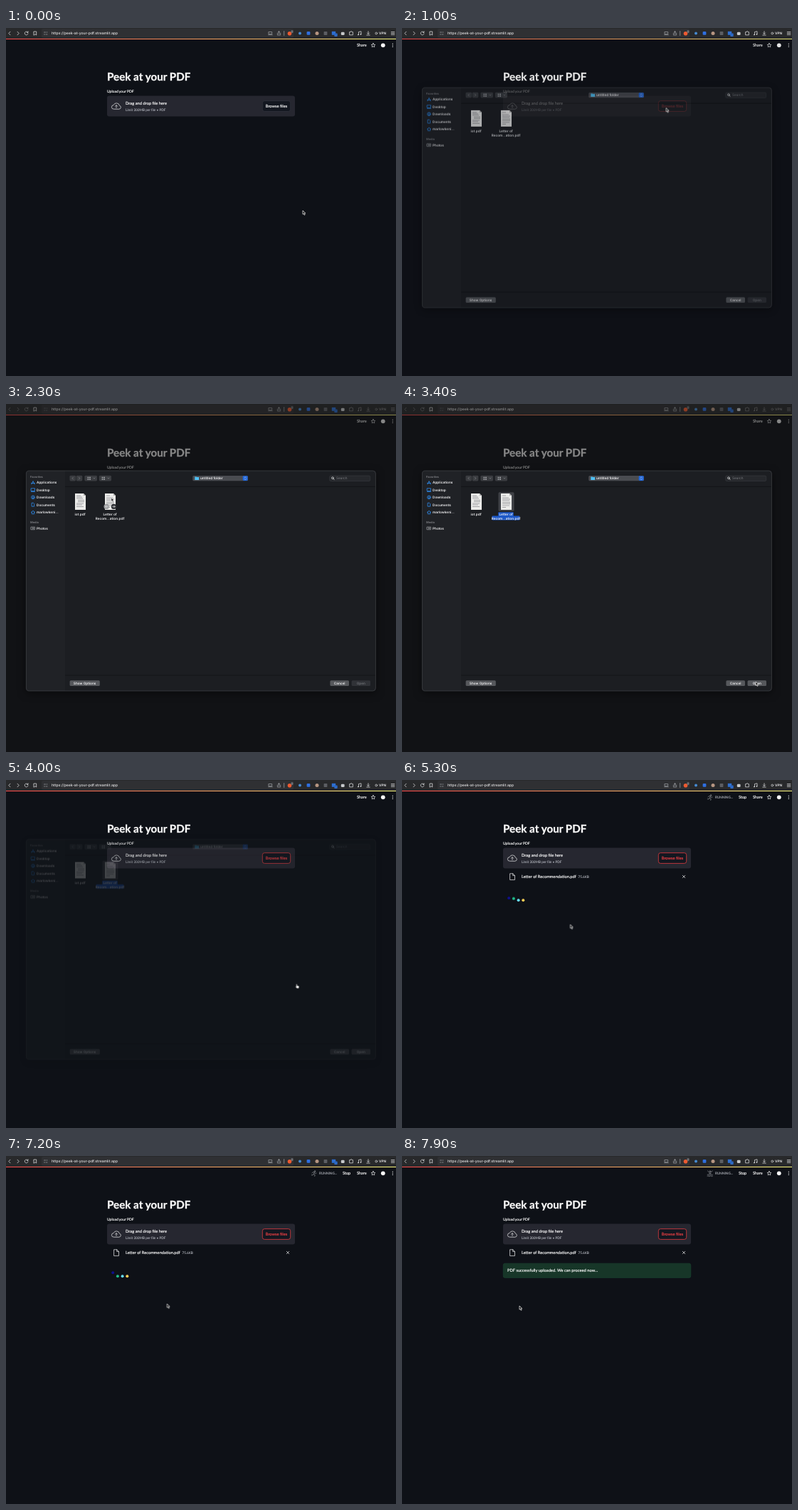
Animation of 548 by 490 pixels, one loop 8000 ms. Source, as an HTML page:

```html
<!DOCTYPE html>
<html lang="en">
<head>
<meta charset="utf-8">
<title>PDF upload</title>
<style>
html, body { margin: 0; width: 100%; height: 100%; overflow: hidden; background: #0e1117; }
svg { display: block; width: 100vw; height: 100vh; }
text { text-rendering: geometricPrecision; white-space: pre; }
.page { font: 5.75px Lato, sans-serif; fill: #fafafa; }
.page text { stroke: currentColor; color: #fafafa; stroke-width: .16; }
.page .title { font-size: 15.2px; font-weight: 700; stroke-width: .3; }
.page .label { font-size: 5px; }
.page .hint { font-size: 4.7px; fill: #b4b7bf; color: #b4b7bf; stroke-width: .08; }
.mac { font: 600 4.7px Inter, sans-serif; fill: #f0f0f2; }
.mac .head { font-size: 4px; fill: #808287; }
.mid { text-anchor: middle; }
.line { fill: none; stroke: #d6d7d9; stroke-width: .8; stroke-linecap: round; stroke-linejoin: round; }
.blue { stroke: #2e8df0; }
.grey { stroke: #96989c; }
.panel { filter: drop-shadow(0 3px 6px rgba(0, 0, 0, .5)); }

.shade, .veil, .fade, .dialog, .cursor, .arrow, .hand, .normal, .hover,
.peek, .picked, .file, .load, .done, .sport { animation: 8s linear infinite; }

.shade { animation-name: shade; opacity: 0; }
@keyframes shade {
  0%, 10% { opacity: 0; }
  16.25% { opacity: .22; }
  21.25%, 43.75% { opacity: .5; }
  48.75%, 100% { opacity: 0; }
}
.veil { animation-name: veil; opacity: 0; }
@keyframes veil {
  0%, 18.75% { opacity: 0; }
  21.25%, 43.75% { opacity: .45; }
  47.5%, 100% { opacity: 0; }
}
.fade { animation-name: fade; }
@keyframes fade {
  0%, 18.75% { opacity: 1; }
  21.25%, 43.75% { opacity: .45; }
  47.5%, 100% { opacity: 1; }
}
.dialog { animation-name: dialog; }
@keyframes dialog {
  0%, 10% { opacity: 0; transform: translateY(-12px); }
  13.5% { opacity: 1; transform: translateY(-9.5px); }
  16.25% { opacity: 1; transform: translateY(-6.4px); }
  20%, 43.75% { opacity: 1; transform: none; }
  46.25% { opacity: .8; transform: translateY(-5px); }
  50% { opacity: .24; transform: translateY(-10.5px); }
  52.5%, 100% { opacity: 0; transform: translateY(-13px); }
}
.cursor { animation-name: cursor; animation-timing-function: ease-in-out; }
@keyframes cursor {
  0%, 1.25% { transform: translate(417px, 257px); }
  7.5%, 11.25% { transform: translate(374px, 110px); }
  16.25%, 21.25% { transform: translate(352.4px, 129px); }
  28.75%, 33.75% { transform: translate(148px, 132px); }
  41.25% { transform: translate(497px, 391px); }
  45% { transform: translate(497px, 391px); animation-timing-function: ease-in; }
  50% { transform: translate(408px, 287px); animation-timing-function: ease-out; }
  55% { transform: translate(320px, 230px); }
  66.25% { transform: translate(236.5px, 203.5px); }
  80%, 88.75% { transform: translate(230px, 208px); }
  96.25%, 100% { transform: translate(165px, 211px); }
}
.arrow, .hand, .normal, .hover, .peek, .picked, .file, .load, .done, .sport { animation-timing-function: step-end; }
.hand { animation-name: hand; }
.arrow { animation-name: arrow; }
@keyframes hand { 0% { opacity: 0; } 6.25% { opacity: 1; } 12.5% { opacity: 0; } 46.25% { opacity: 1; } 52.5%, 100% { opacity: 0; } }
@keyframes arrow { 0% { opacity: 1; } 6.25% { opacity: 0; } 12.5% { opacity: 1; } 46.25% { opacity: 0; } 52.5%, 100% { opacity: 1; } }
.normal { animation-name: normal; }
.hover { animation-name: hover; }
@keyframes normal { 0% { opacity: 1; } 6.25%, 100% { opacity: 0; } }
@keyframes hover { 0% { opacity: 0; } 6.25%, 100% { opacity: 1; } }
.peek { animation-name: peek; }
@keyframes peek { 0% { opacity: 0; } 27.5% { opacity: 1; } 35%, 100% { opacity: 0; } }
.picked { animation-name: picked; }
@keyframes picked { 0% { opacity: 0; } 32.5%, 100% { opacity: 1; } }
.file { animation-name: file; }
@keyframes file { 0% { opacity: 0; } 57.5%, 100% { opacity: 1; } }
.load { animation-name: load; }
@keyframes load { 0% { opacity: 0; } 60% { opacity: 1; } 91.25%, 100% { opacity: 0; } }
.done { animation-name: done; }
@keyframes done { 0% { opacity: 0; } 91.25%, 100% { opacity: 1; } }

.ball { animation: bounce 1s infinite; animation-delay: calc(65ms + var(--i) * 190ms - 1s); }
@keyframes bounce {
  0% { transform: none; animation-timing-function: cubic-bezier(.36, .56, .64, 1); }
  15% { transform: translateY(-5px); animation-timing-function: cubic-bezier(.36, 0, .64, .44); }
  30%, 100% { transform: none; }
}
.run { animation-name: run; }
.ski { animation-name: ski; }
.swim { animation-name: swim; }
.bike { animation-name: bike; }
@keyframes run { 0% { opacity: 0; } 57.5% { opacity: 1; } 67.5% { opacity: 0; } 86.25% { opacity: 1; } 92.5%, 100% { opacity: 0; } }
@keyframes ski { 0% { opacity: 0; } 67.5% { opacity: 1; } 73.75% { opacity: 0; } 92.5% { opacity: 1; } 98.75%, 100% { opacity: 0; } }
@keyframes swim { 0% { opacity: 0; } 73.75% { opacity: 1; } 80% { opacity: 0; } 98.75%, 100% { opacity: 1; } }
@keyframes bike { 0% { opacity: 0; } 80% { opacity: 1; } 86.25%, 100% { opacity: 0; } }
</style>
</head>
<body>
<svg viewBox="0 0 548 490" preserveAspectRatio="none">
  <defs>
    <linearGradient id="stripe"><stop stop-color="#ff4b4b"/><stop offset="1" stop-color="#fffd80"/></linearGradient>
    <g id="sheet">
      <path d="M0 0h12l3 3v20H0z" fill="#ececea"/>
      <path d="M12 0v3h3z" fill="#aaa"/>
    </g>
  </defs>

  <g class="page">
    <rect width="548" height="490" fill="#0e1117"/>
    <rect y="15" width="548" height="1" fill="url(#stripe)"/>
    <text x="493" y="26.2" font-size="5.6">Share</text>
    <path class="line" d="M516 21.4l.9 1.9 2 .2-1.5 1.4.4 2-1.8-1-1.8 1 .4-2-1.5-1.4 2-.2z"/>
    <circle cx="529.8" cy="24.3" r="2.9"/>
    <path d="M543.3 22.2v.01M543.3 24.3v.01M543.3 26.4v.01" stroke="#fafafa" stroke-width="1.2" stroke-linecap="round"/>

    <text class="title" x="142" y="74">Peek at your PDF</text>
    <text class="label" x="142" y="90.8">Upload your PDF</text>
    <rect x="142" y="95.5" width="264" height="29" rx="3" fill="#262730"/>
    <path class="line" d="M151.3 114.2a2.8 2.8 0 0 1-.2-5.6a4.4 4.4 0 0 1 8.4.7a2.5 2.5 0 0 1-.3 4.9zM155 112.4v-3.6M153.5 110.2l1.5-1.5 1.5 1.5"/>
    <text x="168" y="107.7">Drag and drop file here</text>
    <text class="hint" x="168" y="116.7">Limit 200MB per file • PDF</text>
    <g class="normal">
      <rect x="360.3" y="102.6" width="39.4" height="14.8" rx="3" fill="#131720" stroke="#3a3c45" stroke-width=".6"/>
      <text class="mid" x="380" y="112">Browse files</text>
    </g>
    <g class="hover" fill="#ee4145">
      <rect x="360.3" y="102.6" width="39.4" height="14.8" rx="3" fill="#131720" stroke="#e23e42" stroke-width=".8"/>
      <text class="mid" x="380" y="112" style="color:#ee4145">Browse files</text>
    </g>

    <g class="file">
      <path class="line" d="M152 131.8h3.7l2.8 2.8v6h-6.5zM155.7 131.8v2.8h2.8"/>
      <text x="168" y="137.8">Letter of Recommendation.pdf</text>
      <text class="hint" x="247.5" y="137.7">75.6KB</text>
      <path class="line" d="M394.3 134.3l3.5 3.5M397.8 134.3l-3.5 3.5"/>
      <text class="hint" x="440" y="26">RUNNING...</text>
      <text x="473" y="26.2" font-size="5.6">Stop</text>
      <g class="line" style="stroke:#a0a2a7;stroke-width:.65">
        <g class="sport run">
          <circle cx="434" cy="21.4" r=".7"/>
          <path d="M430 24l1.5-1.5 2 .4-1.2 2.4 1.8 1.2-.4 2M433.5 23l1 1.3 1.5-.2M432.3 25.3l-1 1.5h-2"/>
        </g>
        <g class="sport ski">
          <circle cx="433.5" cy="21.2" r=".7"/>
          <path d="M433 22.5l-2 1.4 2 1.6-1 2M431.7 23.5l3 .6M435 23.5l-1.5 5M429 26.8l6.5 1.8"/>
        </g>
        <g class="sport swim">
          <circle cx="432.8" cy="21.6" r=".7"/>
          <path d="M429.5 21l3.2 3 3.4-3M431.4 24.7h2.8M429 26.4q1-.9 1.9 0t1.9 0 1.9 0 1.8 0M429 28.3q1-.9 1.9 0t1.9 0 1.9 0 1.8 0"/>
        </g>
        <g class="sport bike">
          <circle cx="430.2" cy="26.5" r="1.8"/><circle cx="435.3" cy="26.5" r="1.8"/><circle cx="433.8" cy="21.2" r=".7"/>
          <path d="M432.7 27.2v-2l-1.5-1 1.9-1.5 1.2 1.2h1.4"/>
        </g>
      </g>
    </g>

    <g class="load">
      <circle class="ball" style="--i:0" cx="150.2" cy="169.2" r="2" fill="#10108c"/>
      <circle class="ball" style="--i:1" cx="156.9" cy="169.2" r="2" fill="#20bd8c"/>
      <circle class="ball" style="--i:2" cx="163.6" cy="169.2" r="2" fill="#66dcf4"/>
      <circle class="ball" style="--i:3" cx="170.3" cy="169.2" r="2" fill="#f7cd55"/>
    </g>
    <g class="done">
      <rect x="142.2" y="151.2" width="263.6" height="20.2" rx="2.5" fill="#173628" stroke="#1d4a34" stroke-width=".5"/>
      <text x="148" y="163.3">PDF successfully uploaded. We can proceed now...</text>
    </g>
  </g>
  <rect class="shade" y="15" width="548" height="475" fill="#141414"/>

  <g class="mac">
    <rect width="548" height="15" fill="#28292b"/>
    <rect x="50" y="1" width="354" height="13" rx="2" fill="#2f3033"/>
    <text x="64" y="9.4" font-size="5.1" font-weight="500" fill="#e8e8e9">https://peek-at-your-pdf.streamlit.app</text>
    <path class="line" d="M39.3 5h3.4v5l-1.7-1.3-1.7 1.3z"/>
    <g class="fade">
      <path class="line" d="M6 5.2L3.8 7.5 6 9.8M16 5.2l2.2 2.3L16 9.8M30.6 6a2.4 2.4 0 1 0 .4 2M31 4.8v1.6h-1.6"/>
      <path class="line grey" d="M53.5 6h2M57 6h1M53.5 9h1M56 9h2"/>
      <circle cx="520.3" cy="7.5" r="1.4" class="line"/>
      <text x="524" y="9.2">VPN</text>
      <path class="line" d="M541.3 5.6h4.6M541.3 7.5h4.6M541.3 9.4h4.6"/>
      <path class="line" d="M483 5.6h1.2a1 1 0 0 1 2 0h1.2v4.2H483zM495.5 9.6V5.5l3.5-.7v4M509 4.7v3.6M507.5 7l1.5 1.5L510.5 7M506.8 10h4.4"/>
      <circle cx="494.9" cy="9.5" r=".8"/><circle cx="498.4" cy="8.9" r=".8"/>
    </g>
    <path class="line grey" d="M369.3 5.5h4.4v3h-4.4zM368.7 9.7h5.6M382 7h-.6v3h4.2V7h-.6M383.5 8.3V4.6M382.3 5.6l1.2-1.1 1.2 1.1M390.7 4.5v6"/>
    <circle cx="398.5" cy="7.7" r="2.8" fill="#ed5a31"/>
    <rect x="400.5" y="3.3" width="3" height="3.6" rx=".8" fill="#6c6e73"/>
    <circle cx="413" cy="7.5" r="2" fill="#468bd2"/>
    <rect x="422.6" y="5" width="4.8" height="4.8" rx="1" fill="#2f6fe0"/>
    <circle cx="437" cy="7.6" r="2.5" fill="#b79682"/>
    <rect x="446.6" y="5.1" width="4.8" height="4.8" rx=".6" fill="#5c5e63"/>
    <rect x="457.8" y="4.8" width="5.4" height="5" fill="#2d6fd2"/>
    <rect x="461.3" y="7.6" width="4.4" height="4.4" rx=".8" fill="#2c68c4"/>
    <rect x="470.8" y="5.7" width="4.8" height="4.2" rx="1.2" fill="#c7c9cb"/>
    <rect class="veil" width="548" height="15" fill="#141414"/>
  </g>

  <g class="dialog mac">
    <rect class="panel" x="28.4" y="94" width="491" height="310" rx="4" fill="#1c1e22"/>
    <path d="M83 94H32.4a4 4 0 0 0-4 4v302a4 4 0 0 0 4 4H83z" fill="#202226"/>
    <path d="M83 116.4h436.4M83 382h436.4" stroke="#111215" stroke-width=".8"/>
    <rect x="28.4" y="94" width="491" height="310" rx="4" fill="none" stroke="#44474b" stroke-width=".7"/>

    <text class="head" x="34" y="103.6">Favorites</text>
    <text x="43" y="112.3">Applications</text>
    <text x="43" y="122.8">Desktop</text>
    <text x="43" y="133.2">Downloads</text>
    <text x="43" y="143.6">Documents</text>
    <text x="43" y="154.2">marlowkeni...</text>
    <text class="head" x="34" y="168.2">Media</text>
    <text x="43" y="176.7">Photos</text>
    <path class="line blue" d="M36 113l2-4.5 2 4.5M35.5 111.5h5M35.5 118.8h5v3.6h-5zM35.5 123.5h5M36.5 139.3h2l1.2 1.2v3.7h-3.2zM35.5 152.5l2.5-2.2 2.5 2.2M36.3 152v2.8h3.4V152"/>
    <circle class="line blue" cx="38" cy="131.4" r="2.4"/>
    <path class="line blue" d="M38 130v2.7M37 131.8l1 1 1-1"/>
    <path class="line grey" d="M35.3 173.2h5.2v3.6h-5.2z"/><circle class="line grey" cx="37.9" cy="175" r=".9"/>

    <g fill="#3a3c40">
      <rect x="89.5" y="100.8" width="8.6" height="7.6" rx="1.4"/>
      <rect x="98.7" y="100.8" width="8.6" height="7.6" rx="1.4"/>
      <rect x="110.4" y="100.8" width="17.6" height="7.6" rx="1.4"/>
      <rect x="130.8" y="100.8" width="17.2" height="7.6" rx="1.4"/>
    </g>
    <path class="line grey" style="stroke-width:.6" d="M94.4 103.2l-1.3 1.4 1.3 1.4M102.4 103.2l1.3 1.4-1.3 1.4M122.7 104l1.2 1.2 1.2-1.2M142.7 104l1.2 1.2 1.2-1.2"/>
    <path d="M114.5 103.5h4.5M114.5 106h4.5M134.6 103.5h4.5M134.6 106h4.5" stroke="#a9abaf" stroke-width="1.6" stroke-dasharray="1.8 .8"/>
    <rect x="262.3" y="101" width="77.7" height="7.2" rx="1.5" fill="#4a4c51"/>
    <path d="M265.3 102.4h2.2l.6.7h3v4h-5.8z" fill="#4fc0f3"/>
    <text x="273" y="106.3">untitled folder</text>
    <rect x="332.7" y="101.2" width="7" height="6.8" rx="1.4" fill="#1f66dc"/>
    <path class="line" style="stroke-width:.6" d="M335 103.9l1.2-1.2 1.2 1.2M335 105.4l1.2 1.2 1.2-1.2"/>
    <rect x="454.7" y="101" width="57" height="7.5" rx="1.5" fill="#26282c" stroke="#46484c" stroke-width=".4"/>
    <circle class="line" cx="458.9" cy="104.2" r="1.4"/><path class="line" d="M460 105.3l1.2 1.3"/>
    <text x="464" y="106.4" font-weight="400" fill="#7b7d82">Search</text>

    <use href="#sheet" x="97" y="126"/>
    <path d="M99 129h6M99 131h8M99 133h9M101 135.5h9M101 137.5h9M99 140h10M99 142h8M99 144.5h10" stroke="#85868a" stroke-width=".7"/>
    <text class="mid" x="104" y="157">iot.pdf</text>
    <rect class="picked" x="135.5" y="124.3" width="22" height="26.4" rx="1.5" fill="#404247"/>
    <use href="#sheet" x="139" y="126"/>
    <path d="M141 129h5M141 132h9M141 134h11M141 136h10M141 138.5h11M141 140.5h11M141 143h10M141 145.5h5" stroke="#85868a" stroke-width=".7"/>
    <g class="picked" fill="#1d58c8">
      <rect x="135.2" y="152.2" width="21.6" height="6" rx="1"/>
      <rect x="126.5" y="157.5" width="39" height="6" rx="1"/>
    </g>
    <text class="mid" x="146" y="157">Letter of</text>
    <text class="mid" x="146" y="162.6">Recom...ation.pdf</text>
    <g class="peek">
      <circle cx="141.2" cy="144.4" r="3.7" fill="#a0a1a3"/>
      <circle cx="151.5" cy="144.4" r="3.7" fill="#303236"/>
      <path class="line" d="M143 144.4h-3.4M141 143l-1.4 1.4 1.4 1.4M149.7 144.4h3.4M151.7 143l1.4 1.4-1.4 1.4"/>
    </g>

    <g fill="#56585c">
      <rect x="89.6" y="389.3" width="42.2" height="7.6" rx="1.5"/>
      <rect x="455.4" y="389.3" width="26.6" height="7.6" rx="1.5"/>
      <rect x="485.6" y="389.3" width="26.4" height="7.6" rx="1.5" fill="#303237"/>
      <rect class="picked" x="485.6" y="389.3" width="26.4" height="7.6" rx="1.5"/>
    </g>
    <text class="mid" x="110.6" y="394.8">Show Options</text>
    <text class="mid" x="468.7" y="394.8">Cancel</text>
    <text class="mid" x="498.8" y="394.8" fill="#707277">Open</text>
    <text class="mid picked" x="498.8" y="394.8">Open</text>
  </g>

  <g class="cursor">
    <path class="arrow" d="M0 0v5.3l1.2-1.1 1 2.2 1-.5-1-2.1h1.7z" fill="#111" stroke="#f4f4f4" stroke-width=".7"/>
    <path class="hand" d="M.2 1q.7-.8 1.2 0v1.7l2.2.5q.7.3.5 1.2l-.5 2.1H1L-.8 4.2q0-.8 1 0z" fill="#f6f6f6" stroke="#222" stroke-width=".3"/>
  </g>
</svg>
</body>
</html>
```
